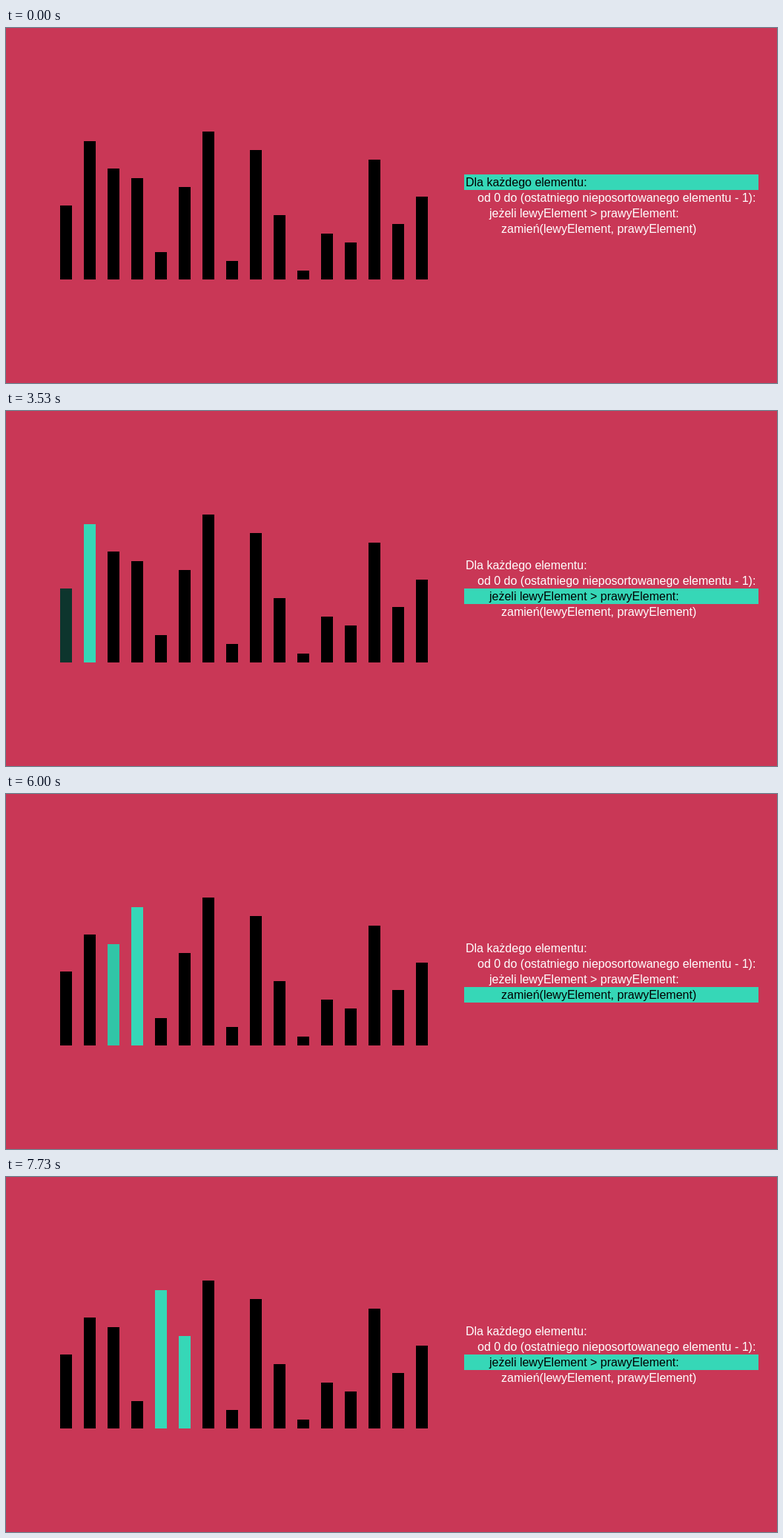
An HTML page with a canvas that plays this animation: 1040x480 px, repeating every 8 s.

```html
<!DOCTYPE html>
<html lang="pl">
<head>
<meta charset="utf-8">
<title>Sortowanie bąbelkowe</title>
<style>
  html, body { margin: 0; width: 100%; height: 100%; overflow: hidden; background: #c93756; }
  canvas { position: absolute; left: 0; top: 0; }
  p {
    position: absolute; left: 618px; width: 397px; height: 21px; margin: 0;
    box-sizing: border-box; white-space: pre; color: #fff;
    font: 16px/21px "Liberation Sans", Arial, sans-serif;
  }
  p.on { background: #36d7b7; color: #000; }
</style>
</head>
<body>
<canvas width="1040" height="480"></canvas>
<script>
const LOOP = 8000, TICK = 1000 / 15;
const INNER = 2333, COMPARE = 2833;        // start of the inner loop and of its first test
const HOLD = 550, FADE = 200, SLIDE = 150; // length of a step, a colour fade, a swap
const TEAL = [54, 215, 183];
const START = [8, 15, 12, 11, 3, 10, 16, 2, 14, 7, 1, 5, 4, 13, 6, 9];

const lines = [
  "Dla każdego elementu:",
  "od 0 do (ostatniego nieposortowanego elementu - 1):",
  "jeżeli lewyElement > prawyElement:",
  "zamień(lewyElement, prawyElement)"
].map((text, i) => {
  const p = document.createElement("p");
  p.textContent = text;
  p.style.top = 198 + 21 * i + "px";
  p.style.paddingLeft = 2 + 16 * i + "px";
  document.body.append(p);
  return p;
});

const ctx = document.querySelector("canvas").getContext("2d");
const progress = (t, start, length) => Math.min(1, Math.max(0, (t - start) / length));
const mix = (a, b, k) => a + (b - a) * k;

// replay the bubble sort up to time t
function sortUntil(t) {
  const bars = START.map(height => ({ height, glow: 0, shift: 0 }));
  let line = t < INNER ? 0 : 1;
  let at = COMPARE;
  for (let i = 0; at <= t; i++) {
    const left = bars[i], right = bars[i + 1];
    line = 2;
    right.glow = progress(t, at, FADE);
    if (i === 0) left.glow = right.glow;
    at += HOLD;

    if (left.height > right.height) {
      if (t >= at) line = 3;
      const k = progress(t, at, SLIDE);
      if (k === 1) {
        [left.height, right.height] = [right.height, left.height];
      } else {
        left.shift = 32 * k;
        right.shift = -32 * k;
      }
      at += HOLD;
    }
    if (t >= at) left.glow = 1 - progress(t, at, FADE);
    at += FADE;
  }
  return { bars, line };
}

function drawBar({ height, glow, shift }, i) {
  const top = Math.round(340 - 12.5 * height);
  ctx.fillStyle = `rgb(${TEAL.map(c => Math.round(c * glow))})`;
  ctx.fillRect(Math.round(73 + 32 * i + shift), top, 16, 340 - top);
}

function drawPointer(t) {
  if (t < 199 || t > 1990) return;
  const enter = progress(t, 200, 400), leave = progress(t, 1667, 200);
  const x = Math.round(mix(mix(1023, 985, enter), 916, leave));
  const y = Math.round(mix(mix(437, 410, enter), 351, leave));
  const arrow = new Path2D("M.3 .5V9L2.2 7.4 3.5 10.6 4.9 10 3.6 6.8H5.8Z");
  ctx.save();
  ctx.translate(x, y);
  ctx.fillStyle = "#fff";
  ctx.strokeStyle = "#000";
  ctx.lineWidth = 0.6;
  ctx.fill(arrow);
  ctx.stroke(arrow);
  ctx.restore();
}

function draw(now) {
  // the picture advances 15 times a second
  const t = Math.floor((now % LOOP + 5) / TICK) * TICK;
  const { bars, line } = sortUntil(t);
  lines.forEach((p, i) => p.classList.toggle("on", i === line));
  ctx.clearRect(0, 0, 1040, 480);
  bars.forEach(drawBar);
  drawPointer(t);
}

let origin;
function frame(now) {
  origin ??= now;
  draw(now - origin);
  requestAnimationFrame(frame);
}
draw(0);
requestAnimationFrame(frame);
</script>
</body>
</html>
```
